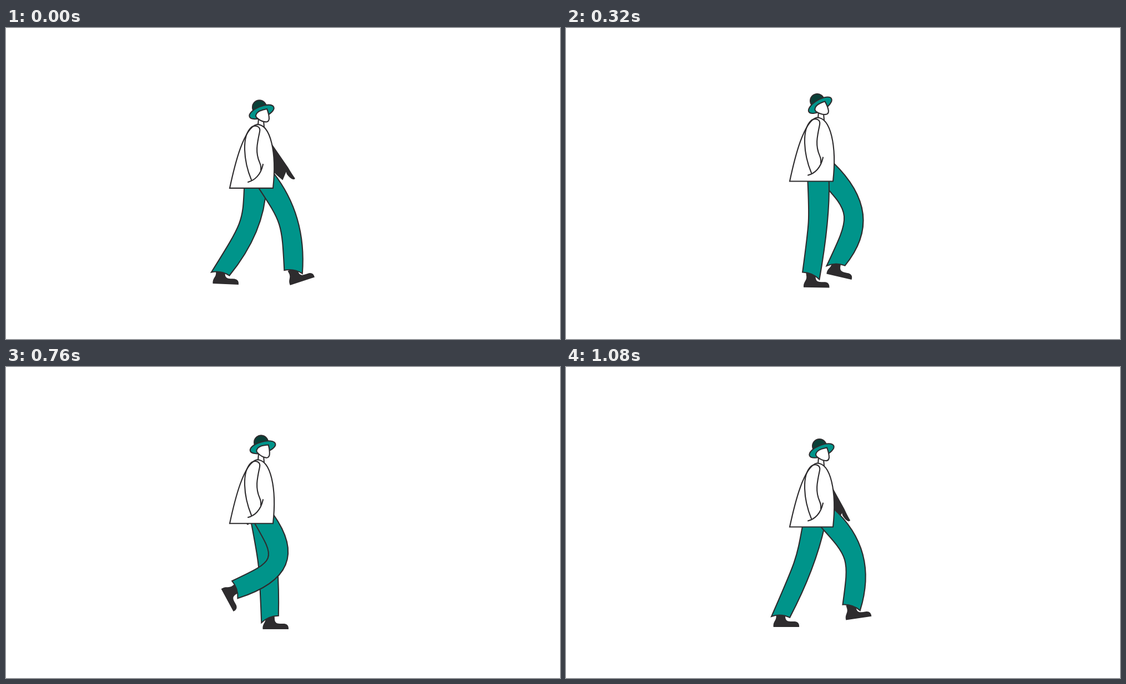
An HTML page with a canvas for the animation above (1.12 s loop, 998x561 px).

```html
<!DOCTYPE html>
<html lang="en">
<head>
<meta charset="utf-8">
<title>Walk cycle</title>
<style>
html, body { margin: 0; overflow: hidden; background: #fff; }
canvas { display: block; }
</style>
</head>
<body>
<canvas id="stage" width="998" height="561"></canvas>
<script>
const ctx = document.getElementById('stage').getContext('2d');
const LOOP = 1120, STEP = 40, HEM = 289;
const INK = '#2e2c2e', TEAL = '#00948a', DEEP = '#0a4038', WHITE = '#fff';
const rad = degrees => degrees * Math.PI / 180;

// Smooth pulse from 0 to 1 and back around a peak time, repeated every loop
function bump(t, peak, half) {
  const d = Math.abs((t - peak + 1.5 * LOOP) % LOOP - LOOP / 2);
  return d < half ? Math.cos(d / half * Math.PI / 2) ** 2 : 0;
}
const wave = (t, peak) => Math.cos((t - peak) / LOOP * 2 * Math.PI);

// Each leg: bone length, cuff slant, boot drop, and the path of its ankle and boot
const nearLeg = {
  bone: 91, slant: 16, drop: 21,
  x: t => 449 + 69 * wave(t, 20),
  y: t => 447 - 48 * bump(t, 820, 400),
  angle: t => 62 * bump(t, 740, 450) - 22 * bump(t, 10, 160)
};
const farLeg = {
  bone: 96.5, slant: -20, drop: 18,
  x: t => 452 - 66 * wave(t, -15) + 16 * bump(t, 260, 260),
  y: t => 455 - 46 * bump(t, 190, 285),
  angle: t => 33 * bump(t, 190, 230) - 17 * bump(t, 480, 160)
};
const hemAt = t => HEM - 13 * bump(t, 285, 300) - 8 * bump(t, 835, 290);
const tiltAt = t => 6.5 * bump(t, 770, 330) - 8.5 * bump(t, 310, 300);
const swingAt = t => 31 * bump(t, 20, 200) - 40 * bump(t, 570, 350);

const boot = new Path2D('M0 0H46.5Q47 -9 39 -10C28 -10 23 -9 21.5 -17L21 -26H4L5 -19C5 -11 -1 -10 0 0Z');
const arm = new Path2D('M-12 6Q-27 48 -8 98L5 88L4 92Q5 102 9 106Q12 108 13 106Q12 99 12 83L6 2Z');
const jacket = new Path2D('M403 289C412 247 428 180 452 174C477 174 488 225 481 289Z');
const sleeve = new Path2D('M442 274C428 240 424 195 442 179C450 174 459 178 457 187C452 210 449 225 457 243Q460 250 459 256');
const pocket = new Path2D('M436 278C448 275 459 265 463 246');
const neck = new Path2D('M455 163L454 176L465 179L464 167');
const face = new Path2D('M450 158C452 149 462 148 470 146Q474 156 474 164Q473 170 468 169.5Q460 169 453 163Q450 161 450 158Z');
const crown = new Path2D(), brim = new Path2D();
crown.arc(456.5, 143, 12.5, 0, 7);
brim.ellipse(460.5, 151.5, 23.5, 10, rad(-22), 0, 7);

function paint(path, fill) {
  if (fill) { ctx.fillStyle = fill; ctx.fill(path); }
  ctx.stroke(path);
}

// Fills a dark shape turned about (x, y), shifted within its own axes
function place(path, x, y, degrees, dx = 0, dy = 0) {
  ctx.save();
  ctx.translate(x, y);
  ctx.rotate(rad(degrees));
  ctx.translate(dx, dy);
  ctx.fillStyle = INK;
  ctx.fill(path);
  ctx.restore();
}

function drawLeg(leg, t, hem) {
  const hipX = 466, hipY = hem - 20, x = leg.x(t), y = leg.y(t);
  place(boot, x, y, leg.angle(t), -13, leg.drop);

  // The knee bends forward whenever hip and ankle come closer than two bones
  const span = Math.hypot(x - hipX, y - hipY);
  const nx = (y - hipY) / span, ny = (hipX - x) / span;
  const bend = Math.sqrt(Math.max(0, leg.bone ** 2 - span ** 2 / 4));
  const kneeX = (hipX + x) / 2 + bend * nx, kneeY = (hipY + y) / 2 + bend * ny;

  // The waist follows the thigh; the cuff is cut at a fixed slant to the shin
  const lean = kneeX - 426;
  const frontX = Math.min(481, 466 + 0.28 * lean), frontY = hem - 2 - 0.55 * Math.max(0, lean - 34);
  const backX = 426 + 0.34 * lean, backY = hem - 2;
  const cut = Math.atan2(kneeX - x, y - kneeY) + rad(leg.slant);
  const cx = 16.5 * Math.cos(cut), cy = 16.5 * Math.sin(cut);

  const fx = kneeX + 17 * nx, fy = kneeY + 17 * ny;
  const bx = (8 * (kneeX - 17 * nx) - backX - x + cx) / 6;
  const by = (8 * (kneeY - 17 * ny) - backY - y + cy) / 6;
  const path = new Path2D();
  path.moveTo(frontX, frontY);
  path.quadraticCurveTo(2 * fx - (frontX + x + cx) / 2, 2 * fy - (frontY + y + cy) / 2, x + cx, y + cy);
  path.quadraticCurveTo(x + cy * 0.4, y - cx * 0.4, x - cx, y - cy);
  path.bezierCurveTo(bx, by, bx, by, backX, backY);
  path.closePath();
  paint(path, TEAL);
}

function drawBody(lift, tilt) {
  ctx.save();
  ctx.translate(0, lift);
  paint(neck, WHITE);
  paint(jacket, WHITE);
  paint(sleeve);
  paint(pocket);
  ctx.translate(461, 170);
  ctx.rotate(rad(tilt));
  ctx.translate(-461, -170);
  paint(crown, DEEP);
  paint(brim, TEAL);
  paint(face, WHITE);
  ctx.restore();
}

function draw(now) {
  const t = Math.floor(now % LOOP / STEP) * STEP;
  const hem = hemAt(t), lift = hem - HEM;
  ctx.fillStyle = WHITE;
  ctx.fillRect(0, 0, 998, 561);
  ctx.strokeStyle = INK;
  ctx.lineWidth = 2.1;
  ctx.lineCap = 'round';
  place(arm, 456, 186 + lift, -swingAt(t));
  drawLeg(farLeg, t, hem);
  drawLeg(nearLeg, t, hem);
  drawBody(lift, tiltAt(t));
  requestAnimationFrame(draw);
}
requestAnimationFrame(draw);
</script>
</body>
</html>
```
